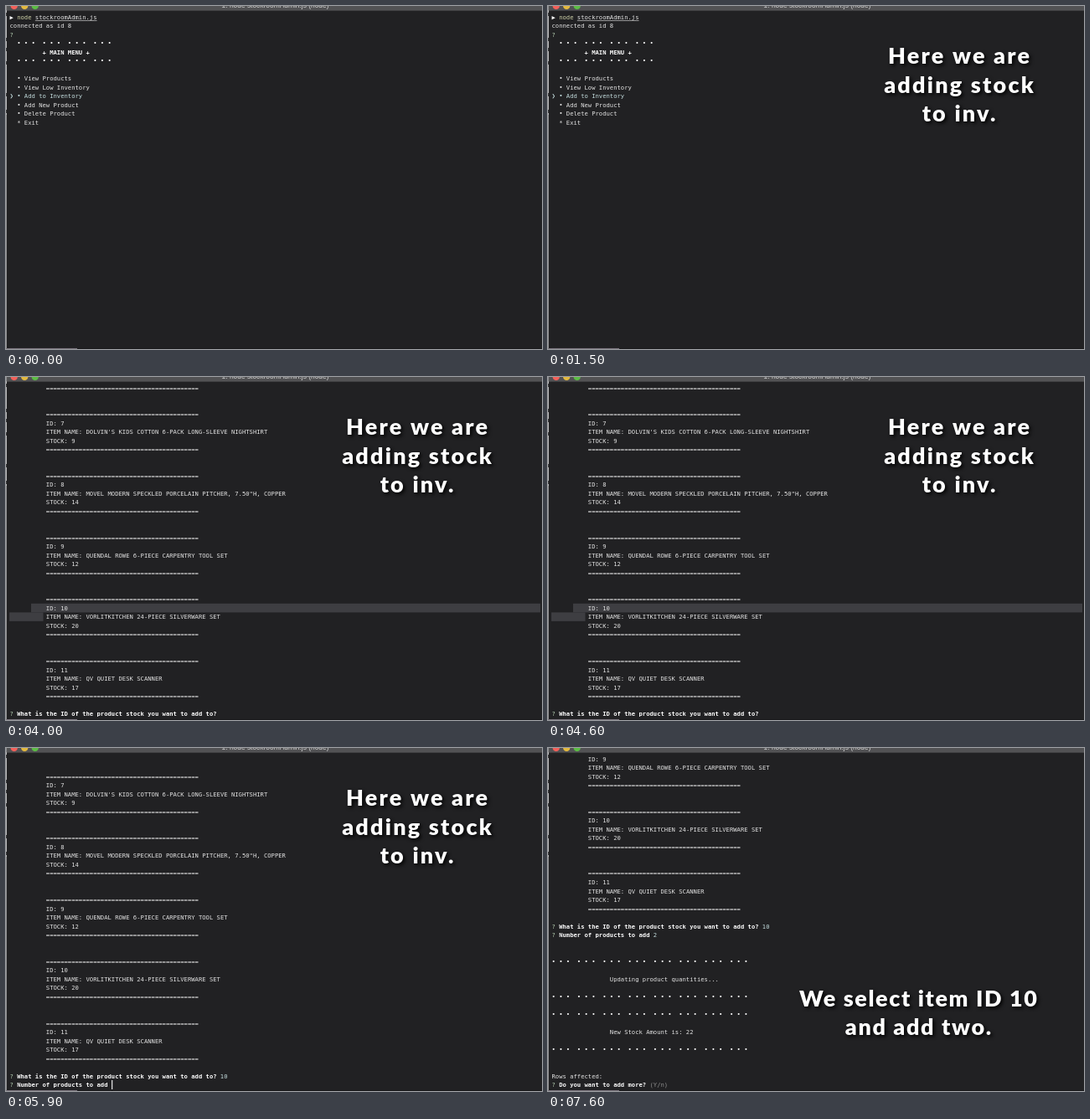
Write an HTML page with a canvas that moves like this. It is 640x410 px and loops after 8000 ms.

```html
<!DOCTYPE html>
<html lang="en">
<head>
<meta charset="utf-8">
<title>Stock manager terminal</title>
<style>
html, body { margin: 0; width: 100%; height: 100%; overflow: hidden; background: #212123; }
canvas { display: block; }
</style>
</head>
<body>
<canvas id="stage" width="640" height="410"></canvas>
<script>
const ctx = document.getElementById('stage').getContext('2d');
const LOOP = 8000, COL = 4.334, ROW = 10.53, LEFT = 4.5, TOP = 13;
const PLAIN = '#e2e2e2', BRIGHT = '#fafafa', CYAN = '#c3dcdd', GREEN = '#b5cdb0', DIM = '#8c8c8c';

const products = [
  [7, "DOLVIN'S KIDS COTTON 6-PACK LONG-SLEEVE NIGHTSHIRT", 9],
  [8, 'MOVEL MODERN SPECKLED PORCELAIN PITCHER, 7.50"H, COPPER', 14],
  [9, 'QUENDAL ROWE 6-PIECE CARPENTRY TOOL SET', 12],
  [10, 'VORLITKITCHEN 24-PIECE SILVERWARE SET', 20],
  [11, 'QV QUIET DESK SCANNER', 17]
];
const menu = ['• View Products', '• View Low Inventory', '• Add to Inventory',
  '• Add New Product', '• Delete Product', '* Exit'];
const rule = '='.repeat(42);
const dots = groups => '• • •  '.repeat(groups);
const ramp = (t, from, to) => Math.min(1, Math.max(0, (t - from) / (to - from)));

function box(x, y, w, h, color) {
  ctx.fillStyle = color;
  ctx.fillRect(x, y, w, h);
}

// Fonts are set at ten times size and scaled down, which keeps fractional advances.
function write(text, x, y, color, font) {
  ctx.save();
  ctx.translate(x, y);
  ctx.scale(0.1, 0.1);
  ctx.font = font;
  ctx.fillStyle = color;
  ctx.fillText(text, 0, 0);
  ctx.restore();
}

function put(row, col, text, color = PLAIN, bold = false) {
  if (row < 0) return;
  write(text, LEFT + col * COL, TOP + row * ROW + 2.6, color,
    `${bold ? 'bold ' : ''}72px "DejaVu Sans Mono", monospace`);
}

function cursor(row, col) {
  box(LEFT + col * COL + 0.2, TOP + row * ROW - 5.6, 1.2, 11, '#e8e8e8');
}

function ask(row, question, answer = '', color = CYAN) {
  put(row, 0, '?', GREEN);
  put(row, 2, question, BRIGHT, true);
  put(row, question.length + 3, answer, color);
  return question.length + 3 + answer.length;
}

function drawWindow() {
  box(0, 0, 640, 410, '#19191b');
  box(0, 0, 1, 410, '#8c8c8e');
  box(0, 5, 1, 125, '#b4b4b6');
  for (const y of [8, 38, 50, 66, 104, 124]) box(0, y, 1, 4, '#3a3a3c');
  box(0, 409, 85, 1, '#77717a');
  ctx.fillStyle = '#212123';
  ctx.beginPath();
  ctx.roundRect(1.5, -10, 650, 419, 4);
  ctx.fill();
  ctx.textAlign = 'left';
}

function drawTitleBar() {
  box(1, 0, 639, 5.6, '#525254');
  ['#f4605a', '#e3b93f', '#5cbd45'].forEach((color, i) => {
    ctx.fillStyle = color;
    ctx.beginPath();
    ctx.arc(9.7 + i * 12.5, -0.3, 4.2, 0, 7);
    ctx.fill();
  });
  ctx.textAlign = 'center';
  write('1. node stockroomAdmin.js (node)', 321.5, 2.3, '#d0d0d0',
    '84px "Liberation Sans", Arial, sans-serif');
  ctx.textAlign = 'left';
}

function drawMenu() {
  put(0, 0, '▶', BRIGHT);
  put(0, 2, 'node', '#cfd2a8');
  put(0, 7, 'stockroomAdmin.js', PLAIN);
  box(LEFT + 7 * COL, TOP + 4, 17 * COL, 0.7, '#c8c8c8');
  put(1, 0, 'connected as id 8');
  put(2, 0, '?', GREEN);
  put(3, 2, dots(4), BRIGHT);
  put(4, 9, '+ MAIN MENU +', BRIGHT, true);
  put(5, 2, dots(4), BRIGHT);
  menu.forEach((item, i) => put(7 + i, 2, item, i === 2 ? CYAN : PLAIN));
  put(9, 0, '❯', CYAN);
}

function drawList(t) {
  const scroll = t < 5800 ? 0 : t < 6500 ? 1 : 18;
  if (t >= 3900 && t < 5100) {
    box(30, 270.8, 608, 10.6, '#3e3e42');
    box(4, 281.4, 40.5, 10.5, '#3e3e42');
  }
  put(-scroll, 10, rule);
  products.forEach(([id, name, stock], i) => {
    [rule, 'ID: ' + id, 'ITEM NAME: ' + name, 'STOCK: ' + stock, rule]
      .forEach((line, j) => put(3 + 7 * i + j - scroll, 10, line));
  });

  const typedId = t < 5600 ? '' : t < 5700 ? '1' : '10';
  let row = 37 - scroll;
  let end = ask(row, 'What is the ID of the product stock you want to add to?',
    typedId, scroll ? CYAN : PLAIN);
  if (scroll) {
    row++;
    end = ask(row, 'Number of products to add', t < 6200 ? '' : '2', t < 6500 ? PLAIN : CYAN);
  }
  if (scroll === 18) {
    for (const r of [23, 27, 29, 33]) put(r, 0, dots(8), BRIGHT);
    put(25, 16, 'Updating product quantities...');
    put(31, 16, 'New Stock Amount is: 22');
    put(36, 0, 'Rows affected:');
    row = 37;
    end = ask(row, 'Do you want to add more?', '(Y/n)', DIM) + 1;
  }
  const hidden = [[2500, 3000], [3500, 4100], [4600, 5100], [7600, 8000]];
  if (!hidden.some(([a, b]) => t >= a && t < b)) cursor(row, end);
}

function caption(lines, x, y, spacing, alpha) {
  if (!alpha) return;
  ctx.save();
  ctx.globalAlpha = alpha;
  ctx.font = '900 27px Lato, sans-serif';
  ctx.letterSpacing = spacing + 'px';
  ctx.textAlign = 'center';
  ctx.fillStyle = '#fff';
  ctx.shadowColor = '#000';
  ctx.shadowBlur = 4;
  ctx.shadowOffsetX = ctx.shadowOffsetY = 2;
  lines.forEach((line, i) => ctx.fillText(line, x + spacing / 2, y + i * 34.5));
  ctx.restore();
}

function draw(t) {
  drawWindow();
  if (t < 1600) drawMenu();
  else drawList(t);
  drawTitleBar();
  caption(['Here we are', 'adding stock', 'to inv.'], 490.5, 69, 2.2,
    ramp(t, 100, 900) * (1 - ramp(t, 5950, 6400)));
  caption(['We select item ID 10', 'and add two.'], 442, 308.5, 1.6, ramp(t, 6500, 7200));
}

const start = performance.now();
function frame() {
  draw((performance.now() - start) % LOOP);
  requestAnimationFrame(frame);
}
frame();
</script>
</body>
</html>
```
